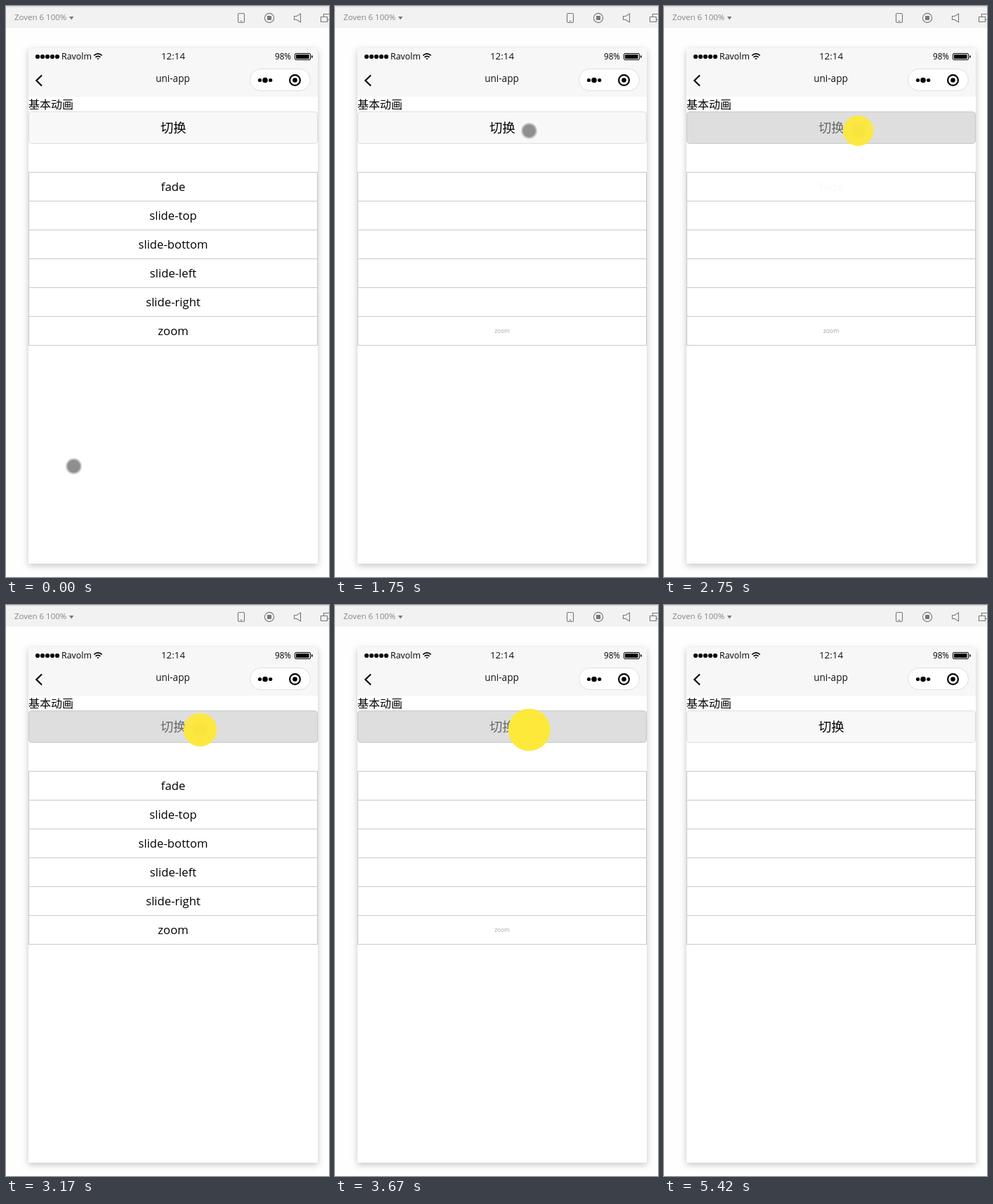
These frames come from a looping animation (460x812 px, 5.51 s). An HTML page:

```html
<!DOCTYPE html>
<html lang="zh">
<head>
<meta charset="utf-8">
<style>
  html, body { margin: 0; width: 100%; height: 100%; overflow: hidden; background: #fefefe; }
  svg { display: block; font-family: "Open Sans", "Noto Sans", sans-serif; }
  .cjk { font-family: "Noto Sans CJK SC", "Noto Sans CJK", sans-serif; }
  .mid { text-anchor: middle; }
  .shadow { filter: drop-shadow(0 3px 5px rgba(0, 0, 0, .22)); }
</style>
</head>
<body>
<svg id="stage" width="460" height="812" viewBox="0 0 460 812">
  <g id="toolbar" fill="none" stroke="#777" stroke-width="1.1">
    <rect width="460" height="31" fill="#f2f2f2" stroke="none"/>
    <rect width="460" height="1.5" fill="#dedede" stroke="none"/>
    <text x="12" y="20" font-size="11.5" fill="#858585" stroke="none">Zoven 6 100%</text>
    <path d="M90 15h6.4l-3.2 4.4z" fill="#777" stroke="none"/>
    <rect x="330.5" y="10.5" width="9" height="13" rx="1.5"/>
    <path d="M333.5 21.5h3"/>
    <circle cx="375" cy="17" r="6.6"/>
    <rect x="372" y="14" width="6" height="6" rx=".8" fill="#777" stroke="none"/>
    <path d="M410.5 14.5h3.5l5.5-3.6v12.2l-5.5-3.6h-3.5z"/>
    <path d="M452.5 16v-4.500h9v8h-4M448.500 15.500h9v7h-9z"/>
  </g>

  <rect class="shadow" x="32" y="60" width="412" height="733" fill="#fff"/>
  <rect x="32" y="60" width="412" height="69" fill="#f7f7f7"/>

  <g id="status">
    <g id="signal"></g>
    <text x="79" y="76" font-size="12.4">Ravolm</text>
    <g fill="none" stroke="#000" stroke-width="1.7">
      <path d="M125.300 70.300q5.700-4.800 11.400 0M127.500 72.800q3.500-3 7 0"/>
      <path d="M129.400 74.200h3.200l-1.600 2.200z" fill="#000" stroke="none"/>
    </g>
    <text class="mid" x="238" y="76.300" font-size="13.4" fill="#111">12:14</text>
    <text x="383" y="76" font-size="11.7">98%</text>
    <rect x="411.500" y="67.500" width="22" height="9" rx="1.5" fill="none" stroke="#000"/>
    <rect x="413" y="69" width="18.500" height="6" rx=".5"/>
    <rect x="435" y="70.300" width="1.600" height="3.400" rx=".6"/>
  </g>

  <g id="nav">
    <path d="M51 98.500L43.300 106l7.700 7.500" fill="none" stroke="#000" stroke-width="2.200"/>
    <text class="mid" x="237.500" y="108.300" font-size="13.6" fill="#111">uni-app</text>
    <rect x="347.500" y="89.500" width="86" height="31" rx="15.500" fill="#fff" stroke="#dfdfdf"/>
    <circle cx="361.500" cy="105.500" r="2.600"/>
    <circle cx="369" cy="105.500" r="3.800"/>
    <circle cx="376.700" cy="105.500" r="2.600"/>
    <circle cx="411.500" cy="105.500" r="7.400" fill="none" stroke="#000" stroke-width="2.200"/>
    <circle cx="411.500" cy="105.500" r="3.300"/>
  </g>

  <text class="cjk" x="32" y="146" font-size="16">基本动画</text>
  <rect id="button" x="32.500" y="150.500" width="411" height="45" rx="4"/>
  <text id="label" class="cjk mid" x="238.300" y="180" font-size="18.400">切换</text>

  <g id="rows"></g>
  <path id="grid" fill="none" stroke="#c9c9c9"/>

  <circle id="cursor" r="10.300" fill="#8f8f8f" stroke="#c4c4c4" stroke-width="2"/>
  <circle id="ripple" cx="276.500" cy="177.500" fill="#fde93a"/>
</svg>

<script>
const NS = "http://www.w3.org/2000/svg";
const LOOP = 5510, STEP = 1000 / 12, LAST_STEP = 65;
const ROW_TOP = 236.5, ROW_H = 41, CENTER = 238;
const EFFECTS = ["fade", "slide-top", "slide-bottom", "slide-left", "slide-right", "zoom"];
const DIRECTION = {
  "slide-top": [0, -1], "slide-bottom": [0, 1], "slide-left": [-1, 0], "slide-right": [1, 0]
};
const DURATION = 300;
const CLICKS = [
  { down: 1170, up: 1470, toggle: 1420 },
  { down: 1780, up: 2180, toggle: 1900 },
  { down: 2370, up: 2620, toggle: 2480 },
  { down: 2700, up: 2960, toggle: 2820 },
  { down: 3090, up: 3800, toggle: 3330 }
];
const POINTER_GONE = 3980, ZOOM_GONE = 4210;

const byId = id => document.getElementById(id);
const set = (node, attrs) => {
  for (const key in attrs) node.setAttribute(key, attrs[key]);
  return node;
};
const add = (parent, tag, attrs) =>
  parent.appendChild(set(document.createElementNS(NS, tag), attrs));
const clamp = v => Math.max(0, Math.min(1, v));
const mix = (a, b, p) => a + (b - a) * p;
const smooth = v => { const p = clamp(v); return p * p * (3 - 2 * p); };

for (let i = 0; i < 5; i++) add(byId("signal"), "circle", { cx: 45 + 7 * i, cy: 72, r: 3.1 });

let gridPath = "M32.5 236.5v246M443.5 236.5v246";
const labels = EFFECTS.map((name, i) => {
  const y = ROW_TOP + i * ROW_H;
  const clip = add(byId("stage"), "clipPath", { id: "clip" + i });
  add(clip, "rect", { x: 33, y, width: 410, height: ROW_H });
  const row = add(byId("rows"), "g", { "clip-path": `url(#clip${i})` });
  const text = add(row, "text", { class: "mid", x: 0, y: 6, "font-size": 16.7 });
  text.textContent = name;
  gridPath += `M32 ${y}h412`;
  return text;
});
set(byId("grid"), { d: gridPath + "M32 482.5h412" });

// 0 = shown, 1 = hidden
function hiddenAmount(t) {
  let amount = 0;
  CLICKS.forEach((click, i) => {
    if (t < click.toggle) return;
    const p = smooth((t - click.toggle) / DURATION);
    amount = i % 2 ? 1 - p : p;
  });
  return amount;
}

function drawRows(t) {
  const h = hiddenAmount(t);
  labels.forEach((text, i) => {
    const name = EFFECTS[i];
    const [dx, dy] = DIRECTION[name] || [0, 0];
    const x = CENTER + dx * 410 * h, y = ROW_TOP + 20.5 + i * ROW_H + dy * ROW_H * h;
    const zoom = name === "zoom";
    const opacity = !zoom ? 1 - h : t >= ZOOM_GONE ? 0 : mix(1, 0.35, h);
    const scale = zoom ? mix(1, 0.5, h) : 1;
    set(text, { transform: `translate(${x} ${y}) scale(${scale})`, opacity });
  });
}

function drawButton(t) {
  const pressed = CLICKS.some(c => t >= c.down - 5 && t < c.up);
  set(byId("button"), {
    fill: pressed ? "#dedede" : "#f8f8f8",
    stroke: pressed ? "#c8c8c8" : "#dedede"
  });
  set(byId("label"), { fill: pressed ? "#686868" : "#000" });
}

function drawPointer(t) {
  const p = smooth((t - 50) / 1060);
  set(byId("cursor"), {
    cx: mix(96.5, 276.5, p) + 30 * Math.sin(Math.PI * p),
    cy: mix(654.5, 177.5, p),
    opacity: t < POINTER_GONE ? 1 : 0
  });

  let level = 0;
  for (const c of CLICKS) {
    if (t < c.down - 5) continue;
    const rise = clamp((t - c.down) / 160);
    const fall = clamp((t - c.up - 100) / 80);
    level = fall < 1 ? Math.min(rise, 1 - fall) : -1;
  }
  const visible = t >= CLICKS[0].down - 5 && level >= 0;
  set(byId("ripple"), {
    r: mix(18, 30, level),
    opacity: visible ? clamp(0.92 + 0.08 * level) : 0
  });
}

function draw(ms) {
  const step = Math.min(LAST_STEP, Math.floor((ms % LOOP + 5) / STEP));
  const t = step * STEP;
  drawRows(t);
  drawButton(t);
  drawPointer(t);
}

const start = performance.now();
function tick() {
  draw(performance.now() - start);
  requestAnimationFrame(tick);
}
tick();
</script>
</body>
</html>
```
